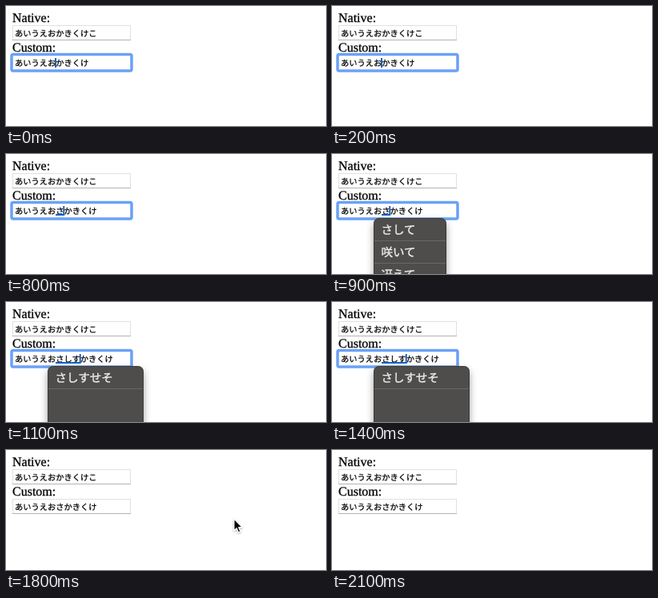
Recreate the animation shown at these times as an HTML page. Size 400 px wide and 150 px high, loop 2.4 s.

```html
<!DOCTYPE html>
<html lang="ja">
<head>
<meta charset="utf-8">
<title>IME input</title>
<style>
html, body { margin: 0; width: 100%; height: 100%; overflow: hidden; background: #fff; }
svg { display: block; width: 400px; height: 150px; }
text { white-space: pre; text-rendering: geometricPrecision; }
.label { font: 16px "Liberation Serif", Times, serif; stroke: #000; stroke-width: .3px; }
.value { font: 10.25px "Noto Sans CJK JP", "Noto Sans CJK", sans-serif; stroke: #000; stroke-width: .25px; }
.item { font: 14.5px "Noto Sans CJK JP", "Noto Sans CJK", sans-serif; fill: #ececea; stroke: #ececea; stroke-width: .4px; }
.edge { fill: none; stroke: #e0e0e0; }
.base { stroke: #b4b4b4; }
.rule { stroke: #696866; }
</style>
</head>
<body>
<svg viewBox="0 0 400 150">
  <defs>
    <filter id="shade" x="-30%" y="-30%" width="160%" height="160%">
      <feDropShadow dx="0" dy="5" stdDeviation="5" flood-opacity=".38"/>
    </filter>
    <filter id="glow" x="-50%" y="-50%" width="200%" height="200%">
      <feDropShadow dx="0" dy="1" stdDeviation=".8" flood-opacity=".4"/>
    </filter>
  </defs>

  <text class="label" x="8" y="19.7">Native:</text>
  <rect class="edge" x="8.5" y="24.5" width="147" height="18"/>
  <path class="base" d="M8 42.5H156"/>
  <text class="value" x="11" y="37.8">あいうえおかきくけこ</text>

  <text class="label" x="8" y="56.7">Custom:</text>
  <rect class="edge" x="8.5" y="61.5" width="147" height="18"/>
  <path class="base" d="M8 79.5H156"/>
  <rect id="ring" x="7" y="60.5" width="150" height="20.5" rx="2" fill="#fff" stroke="#6ba1f6" stroke-width="3.5"/>
  <text id="custom" class="value" x="11" y="74.8"></text>
  <rect id="mark" x="62" y="75" height="2" fill="#1b62bd"/>
  <rect id="caret" y="65" width="2" height="12" fill="#1b62bd"/>

  <g id="popup">
    <rect id="panel" x="52.5" y="80.5" height="100" rx="6" fill="#4f4e4c" stroke="#3b3a39" filter="url(#shade)"/>
    <g id="items"></g>
  </g>

  <path id="pointer" transform="translate(285 86.2)" d="M0 0V14.5L3.3 11.5L5.6 16.8L8.1 15.7L5.8 10.5H10.3Z"
        fill="#000" stroke="#fff" stroke-width="1.2" stroke-linejoin="round" filter="url(#glow)"/>
</svg>
<script>
const LOOP = 2400, EM = 10.25, START = 62;
const BEFORE = "あいうえお", AFTER = "かきくけ";
const SHORT = { width: 90, items: ["さして", "咲いて", "冴えて"] };
const LONG = { width: 119, items: ["さしすせそ"] };

const steps = [
  { at: 0, focus: true, caret: true, typed: "" },
  { at: 700, focus: true, caret: true, typed: "ｓ", marked: true },
  { at: 800, focus: true, caret: true, typed: "さ", marked: true },
  { at: 900, focus: true, caret: true, typed: "さ", marked: true, list: SHORT },
  { at: 1000, focus: true, caret: true, typed: "さし", marked: true, list: LONG },
  { at: 1100, focus: true, caret: true, typed: "さしす", marked: true, list: LONG },
  { at: 1600, focus: true, typed: "さしす", marked: true, list: LONG, pointer: true },
  { at: 1800, typed: "さ", pointer: true },
  { at: 2100, typed: "さ" }
];

const $ = id => document.getElementById(id);
const show = (id, on) => { $(id).style.display = on ? "" : "none"; };

function listMarkup({ width, items }) {
  return items.map((word, i) => {
    const y = 108.5 + 28 * i;
    return `<text class="item" x="61.5" y="${y - 8.7}">${word}</text>` +
      `<path class="rule" d="M53 ${y}h${width - 1}"/>`;
  }).join("");
}

function draw(step) {
  const width = step.typed.length * EM;
  $("custom").textContent = BEFORE + step.typed + AFTER;
  $("mark").setAttribute("width", width);
  $("caret").setAttribute("x", START - 1 + width);
  show("ring", step.focus);
  show("caret", step.caret);
  show("mark", step.marked);
  show("popup", step.list);
  show("pointer", step.pointer);
  if (step.list) {
    $("panel").setAttribute("width", step.list.width);
    $("items").innerHTML = listMarkup(step.list);
  }
}

let current;
function tick() {
  const time = performance.now() % LOOP;
  const step = steps.filter(s => s.at <= time).pop();
  if (step !== current) draw(current = step);
  requestAnimationFrame(tick);
}
tick();
</script>
</body>
</html>
```
